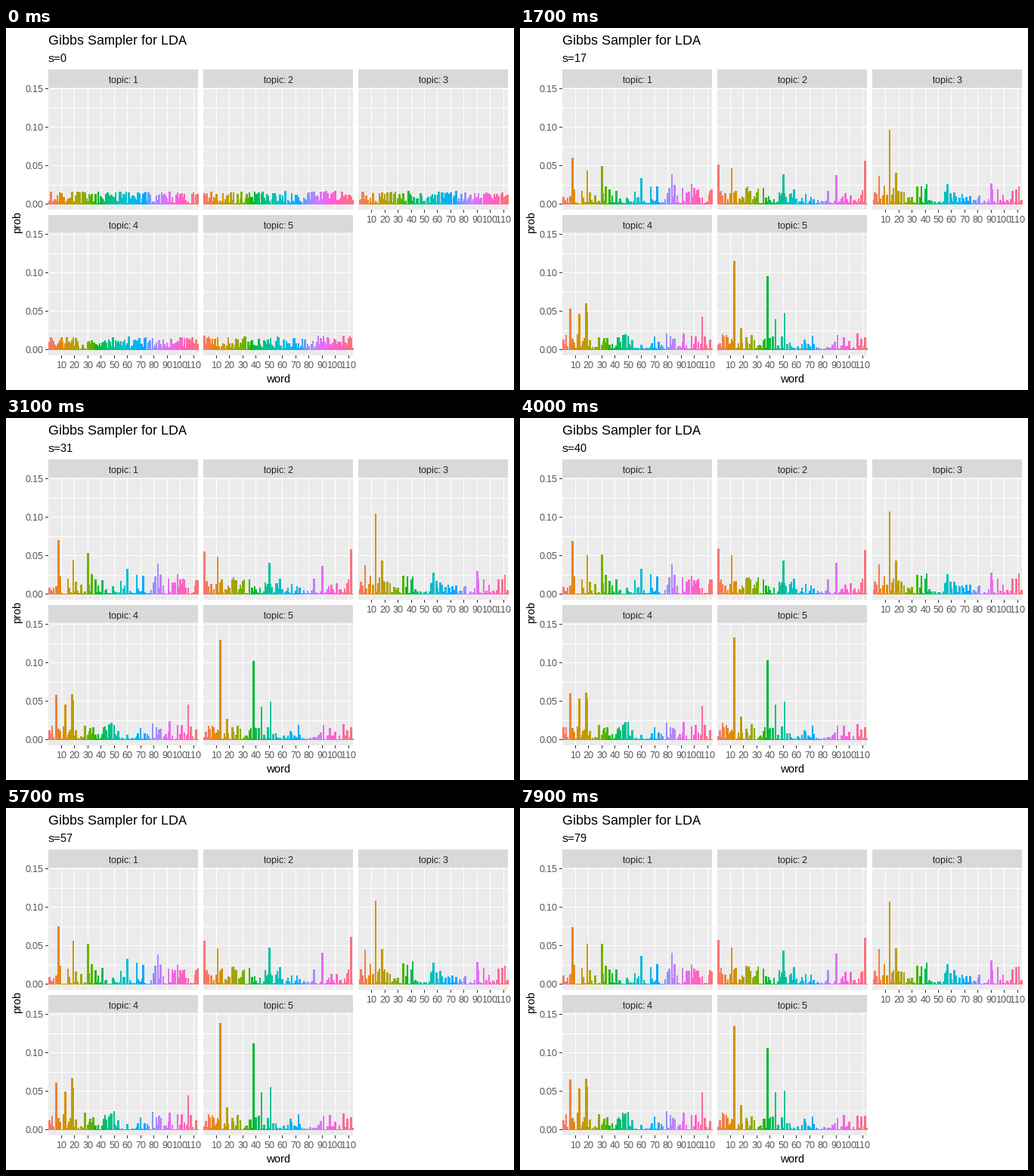
A matplotlib script for the animation above (8000 ms loop, 672 px wide and 480 px high).

```python
import numpy as np
import matplotlib.pyplot as plt
from matplotlib.animation import FuncAnimation
from matplotlib.collections import PolyCollection
from matplotlib.patches import Rectangle

W, H, DPI = 672, 480, 96
FRAMES, STEP = 80, 100
WORDS = 113
LEFT, TOP, GAP, STRIP = 56.5, 55.32, 7.33, 23.7
PANEL_W = (W - GAP - LEFT - 2 * GAP) / 3
PANEL_H = 162.1
PITCH_X, PITCH_Y = PANEL_W + GAP, 192.96
UNIT = PANEL_W / (WORDS + 0.2)  # pixels per word
SCALE = 1022                    # pixels per unit of probability

# Dominant words of each topic, with their settled probability
TOPICS = [
    {8: 0.075, 30: 0.054, 19: 0.050, 83: 0.040, 60: 0.037},
    {112: 0.062, 1: 0.061, 11: 0.049, 50: 0.043, 90: 0.042},
    {13: 0.108, 18: 0.044, 5: 0.042, 90: 0.030},
    {18: 0.065, 6: 0.063, 13: 0.054, 19: 0.053, 106: 0.047},
    {13: 0.138, 38: 0.109, 51: 0.052, 44: 0.049, 18: 0.031},
]

plt.rcParams.update({"font.family": "Liberation Sans",
                     "text.hinting": "native", "text.hinting_factor": 1})


def hue_colors(n, lum=65, chroma=100):
    """Evenly spaced hues in polar LUV, converted to sRGB."""
    h = np.radians(15 + 360 * np.arange(n) / n)
    u = chroma * np.cos(h) / (13 * lum) + 0.1978
    v = chroma * np.sin(h) / (13 * lum) + 0.4683
    y = np.full(n, ((lum + 16) / 116) ** 3)
    x = 9 * y * u / (4 * v)
    z = -x / 3 - 5 * y + 3 * y / v
    m = np.array([[3.2405, -1.5371, -0.4985],
                  [-0.9693, 1.8760, 0.0416],
                  [0.0556, -0.2040, 1.0572]])
    rgb = np.clip(m @ np.array([x, y, z]), 0, 1)
    rgb = np.where(rgb > 0.00304, 1.055 * rgb ** (1 / 2.4) - 0.055, 12.92 * rgb)
    return np.clip(rgb, 0, 1).T


def simulate(peaks, rng):
    """Word probabilities per step: flat noise settling into a topic."""
    start = rng.random(WORDS)
    start /= start.sum()
    # Minor words share what the dominant ones leave over
    goal = rng.random(WORDS) ** 3
    goal *= (1 - sum(peaks.values())) / goal.sum()
    for word, p in peaks.items():
        goal[word - 1] = p
    probs = np.empty((FRAMES, WORDS))
    drift = rng.standard_normal(WORDS)
    for s in range(FRAMES):
        mix = 1 - 0.75 * np.exp(-s / 3) - 0.25 * np.exp(-s / 25)
        wobble = 0.010 * np.sqrt(goal) * drift
        probs[s] = (1 - mix) * start + mix * (goal + wobble)
        drift = 0.92 * drift + 0.39 * rng.standard_normal(WORDS)
    return np.maximum(probs, 0.0002)


rng = np.random.default_rng(12)
colors = hue_colors(WORDS)

fig = plt.figure(figsize=(W / DPI, H / DPI), dpi=DPI, facecolor="white")
ax = fig.add_axes([0, 0, 1, 1])
ax.set_xlim(0, W)
ax.set_ylim(H, 0)
ax.axis("off")


def box(x0, y0, x1, y1, color, z=1):
    """Fill a box snapped to whole pixels."""
    x0, y0, x1, y1 = (int(v) for v in (x0, y0, x1, y1))
    ax.add_patch(Rectangle((x0, y0), x1 - x0, y1 - y0, fc=color, lw=0,
                           antialiased=False, zorder=z))


def label(x, y, text, px, color="black", ha="center", **kw):
    return ax.text(x, y, text, fontsize=px * 72 / DPI, color=color,
                   ha=ha, va="baseline", **kw)


class Panel:
    def __init__(self, index, peaks):
        self.probs = simulate(peaks, rng)
        row, col = divmod(index, 3)
        left, strip = LEFT + col * PITCH_X, TOP + row * PITCH_Y
        top, right = strip + STRIP, left + PANEL_W
        bottom = top + PANEL_H
        self.zero = top + 154.88
        box(left, strip, right, top, "#D9D9D9")
        box(left, top, right, bottom, "#EBEBEB")
        label((left + right) / 2, int(strip) + 18, f"topic: {index + 1}",
              12, "#1A1A1A")

        for i in range(7):
            y = int(self.zero - i * 0.025 * SCALE)
            box(left, y, right, y + 1, "white", 2)
            if col == 0 and i % 2 == 0:
                box(left - 4, y, left, y + 1, "#333333")
                label(50, y + 5, f"{i * 0.025:.2f}", 12, "#4D4D4D", "right")
        for word in range(10, 111, 10):
            x = int(left + (word - 0.4) * UNIT)
            box(x, top, x + 1, bottom, "white", 2)
            if row == 1 or col == 2:
                box(x, bottom, x + 1, bottom + 4, "#333333")
                label(x + 0.5, int(bottom) + 17, word, 12, "#4D4D4D")

        cx = left + (np.arange(1, WORDS + 1) - 0.4) * UNIT
        self.x0 = np.floor(cx - 0.45 * UNIT)
        self.x1 = np.floor(cx + 0.45 * UNIT) + 1
        self.bars = PolyCollection([], facecolors=colors, linewidths=0,
                                   antialiaseds=False, zorder=3)
        ax.add_collection(self.bars, autolim=False)

    def show(self, s):
        top = np.floor(self.zero - self.probs[s] * SCALE)
        base = np.full(WORDS, np.floor(self.zero) + 1)
        xs = np.stack([self.x0, self.x1, self.x1, self.x0], axis=1)
        ys = np.stack([top, top, base, base], axis=1)
        self.bars.set_verts(np.stack([xs, ys], axis=2))


panels = [Panel(i, peaks) for i, peaks in enumerate(TOPICS)]
label(56, 22, "Gibbs Sampler for LDA", 18, ha="left")
subtitle = label(56, 45, "s=0", 15, ha="left")
label(360, 470, "word", 15)
label(19, 257, "prob", 15, rotation=90, rotation_mode="anchor")


def update(s):
    subtitle.set_text(f"s={s}")
    for panel in panels:
        panel.show(s)
    return [subtitle] + [p.bars for p in panels]


anim = FuncAnimation(fig, update, frames=FRAMES, interval=STEP,
                     repeat=True, repeat_delay=0, blit=False)
plt.show()
```
